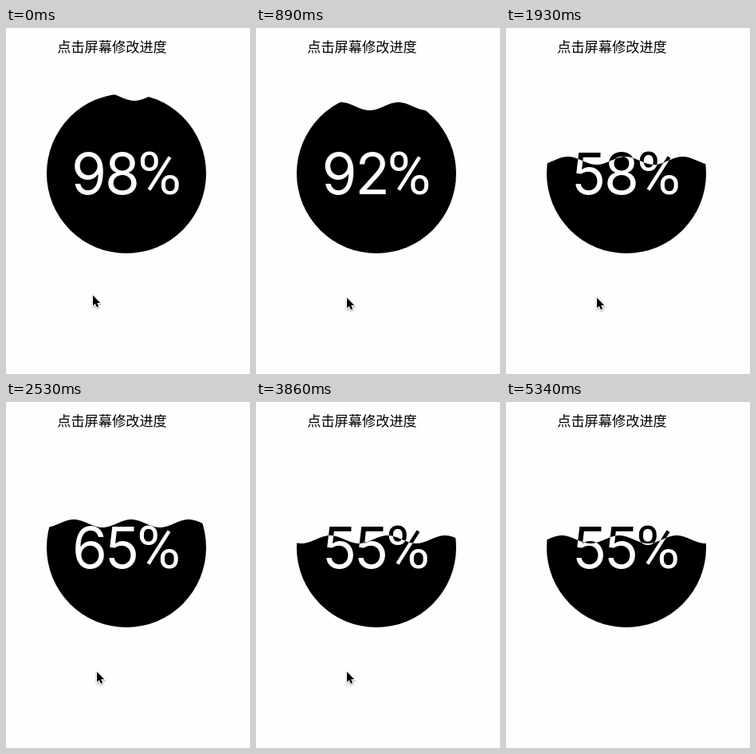
Animation, 306 px wide and 433 px high, one loop 5.44 s. Source, as an HTML page with a canvas:

```html
<!DOCTYPE html>
<html lang="zh-CN">
<head>
<meta charset="utf-8">
<title>进度</title>
<style>
  html, body { margin: 0; width: 100%; height: 100%; overflow: hidden; background: #fefefe; }
  canvas { display: block; width: 306px; height: 433px; }
</style>
</head>
<body>
<canvas id="stage"></canvas>
<script>
const W = 306, H = 433, LOOP = 5440, TICK = 147.9, TICKS = 36;
const BALL = { x: 151, y: 182, r: 100 };
const WAVE = { length: 72, height: 5 };

// [tick, value]
const LEVELS = [[0, 98], [4, 92], [10, 58], [15, 65], [20, 31], [24, 88], [25, 55]];
const CRESTS = [[0, 125], [6, 34.5], [13, -66.4], [17, -131], [23, -213], [26, -267], [36, -434]];
const POINTER_X = [[0, 109], [1, 109], [3, 114], [27, 114], [31, 264], [32, 259]];
const POINTER_Y = [[0, 334.6], [1, 334.6], [3, 337.6], [27, 337.6], [31, 420], [32, 424]];
const POINTER_GONE = 33;

const canvas = document.getElementById('stage');
const ctx = canvas.getContext('2d');
const dpr = window.devicePixelRatio || 1;
canvas.width = W * dpr;
canvas.height = H * dpr;

function held(keys, t) {
  return keys.filter(k => k[0] <= t).pop()[1];
}

function tween(keys, t) {
  const i = keys.findIndex(k => k[0] >= t);
  if (i < 0) return keys[keys.length - 1][1];
  if (i === 0) return keys[0][1];
  const [a, va] = keys[i - 1], [b, vb] = keys[i];
  return va + (vb - va) * (t - a) / (b - a);
}

function drawWater(level, crest) {
  const mean = BALL.y + BALL.r - level * BALL.r / 50;
  const left = BALL.x - BALL.r, right = BALL.x + BALL.r;
  ctx.save();
  ctx.beginPath();
  ctx.moveTo(left, BALL.y + BALL.r);
  for (let x = left; x <= right; x++) {
    ctx.lineTo(x, mean - WAVE.height * Math.cos((x - crest) / WAVE.length * 2 * Math.PI));
  }
  ctx.lineTo(right, BALL.y + BALL.r);
  ctx.clip();
  ctx.beginPath();
  ctx.arc(BALL.x, BALL.y, BALL.r, 0, 2 * Math.PI);
  ctx.fillStyle = '#000';
  ctx.fill();
  ctx.restore();
}

// a run of text with its inked extent
function run(text, font, spacing) {
  ctx.font = font;
  ctx.letterSpacing = spacing;
  const box = ctx.measureText(text);
  const left = -box.actualBoundingBoxLeft;
  return { text, font, spacing, left, width: box.actualBoundingBoxRight - left };
}

function drawLabel(level) {
  ctx.save();
  // white in difference mode inverts whatever lies below
  ctx.globalCompositeOperation = 'difference';
  ctx.fillStyle = '#fff';
  ctx.textAlign = 'left';
  const gap = 4;
  const runs = [
    run(String(level), '400 71px Inter, sans-serif', '-2px'),
    run('%', '400 75px Roboto, sans-serif', '0px')
  ];
  let x = BALL.x + 0.5 - (runs[0].width + gap + runs[1].width) / 2;
  for (const r of runs) {
    ctx.font = r.font;
    ctx.letterSpacing = r.spacing;
    ctx.fillText(r.text, x - r.left, 207.5);
    x += r.width + gap;
  }
  ctx.restore();
}

function drawTitle() {
  ctx.fillStyle = '#000';
  ctx.font = '400 17.2px "Noto Sans CJK SC", "Noto Sans CJK", sans-serif';
  ctx.textAlign = 'center';
  ctx.fillText('点击屏幕修改进度', 133, 30);
}

function drawPointer(x, y) {
  ctx.save();
  ctx.translate(x, y);
  ctx.beginPath();
  ctx.moveTo(0, 0);
  ctx.lineTo(0, 13);
  ctx.lineTo(2.9, 10.3);
  ctx.lineTo(5, 15);
  ctx.lineTo(7.2, 14);
  ctx.lineTo(5.2, 9.4);
  ctx.lineTo(9.2, 9.4);
  ctx.closePath();
  ctx.shadowColor = 'rgba(0,0,0,.4)';
  ctx.shadowBlur = 2 * dpr;
  ctx.shadowOffsetY = dpr;
  ctx.strokeStyle = '#fff';
  ctx.lineWidth = 2;
  ctx.stroke();
  ctx.shadowColor = 'transparent';
  ctx.fillStyle = '#000';
  ctx.fill();
  ctx.restore();
}

function draw(now) {
  const tick = Math.min(TICKS, Math.floor(now % LOOP / TICK));
  const level = held(LEVELS, tick);
  ctx.setTransform(dpr, 0, 0, dpr, 0, 0);
  ctx.fillStyle = '#fefefe';
  ctx.fillRect(0, 0, W, H);
  drawTitle();
  drawWater(level, tween(CRESTS, tick));
  drawLabel(level);
  if (tick < POINTER_GONE) drawPointer(tween(POINTER_X, tick), tween(POINTER_Y, tick));
}

let start;
function loop(now) {
  start ??= now;
  draw(now - start);
  requestAnimationFrame(loop);
}
requestAnimationFrame(loop);
</script>
</body>
</html>
```
